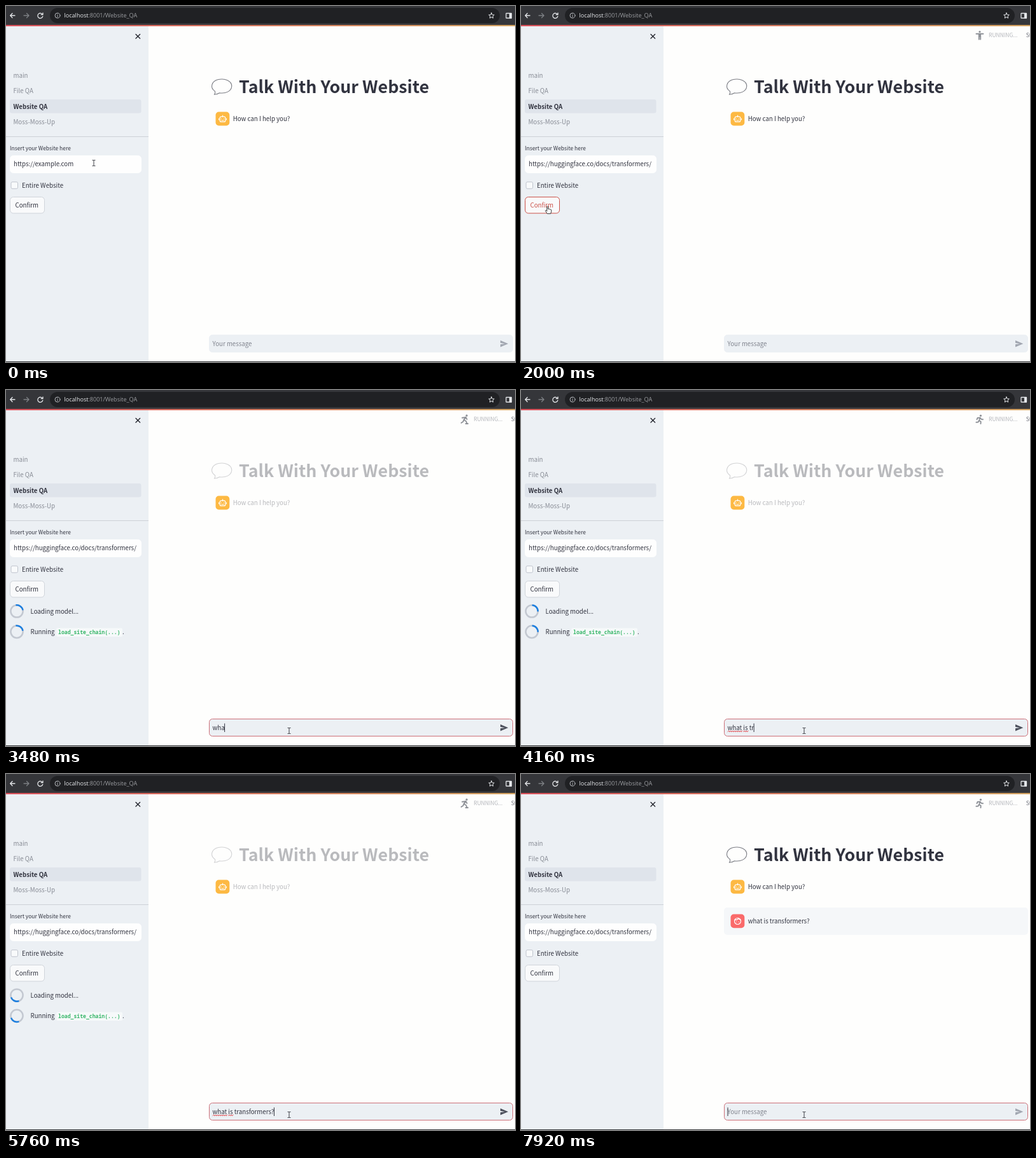
Write an HTML page that moves like this. It is 800 px wide and 560 px high and loops after 8000 ms.

```html
<!DOCTYPE html>
<html lang="en">
<head>
<meta charset="utf-8">
<title>Talk With Your Website</title>
<style>
html, body { margin: 0; width: 100%; height: 100%; overflow: hidden; background: #fefefd; }
svg { display: block; width: 800px; height: 560px; }
text { font: 9.7px "Noto Sans CJK JP", "Noto Sans CJK SC", "Noto Sans CJK", sans-serif; fill: #31333f; font-kerning: normal; white-space: pre; }
.bold { font-weight: 700; }
.nav { fill: #878b94; }
.title { font-size: 26.8px; font-weight: 700; }
.small { font-size: 8.5px; }
.url { font: 9.05px "Open Sans", "Noto Sans", sans-serif; fill: #9b9da1; }
.url tspan { fill: #e8eaed; }
.code { font: 600 8.14px "Noto Sans Mono", "DejaVu Sans Mono", monospace; fill: #35b567; }
.line { fill: none; stroke-linecap: round; stroke-linejoin: round; }
</style>
</head>
<body>
<svg viewBox="0 0 800 560">
  <defs>
    <linearGradient id="strip"><stop stop-color="#e04a55"/><stop offset="1" stop-color="#d9a45c"/></linearGradient>
    <g id="spinner">
      <circle r="9.6" fill="none" stroke="#c3c8d1" stroke-width="2.5"/>
      <path class="arc" d="M-6.8-6.8A9.6 9.6 0 0 1 6.8-6.8" fill="none" stroke="#1c7fe0" stroke-width="2.5"/>
    </g>
  </defs>

  <rect width="800" height="560" fill="#fefefd"/>
  <rect y="30" width="224" height="530" fill="#ecf0f4"/>

  <!-- browser bar -->
  <rect width="800" height="30" fill="#35363a"/>
  <rect x="69" y="3" width="707" height="24" rx="12" fill="#202124"/>
  <g class="line" stroke="#e4e6e9" stroke-width="1.3">
    <path d="M14 15H7M10 11.5L6.7 15 10 18.5"/>
    <path d="M28 15H35.5M32.5 11.5L36 15 32.5 18.5" stroke="#7d8084"/>
    <path d="M57.2 13A4 4 0 1 0 57.8 16.2M58 10.8V13.6H55.2"/>
    <circle cx="81" cy="15" r="4" stroke="#b5b8bc" stroke-width="1"/>
    <path d="M81 14.7V17M81 12.8V13" stroke="#b5b8bc" stroke-width="1"/>
    <path d="M763 10.8L764.2 13.7 767.3 14 765 16.1 765.7 19.1 763 17.5 760.3 19.1 761 16.1 758.7 14 761.8 13.7Z" stroke-width="1"/>
    <rect x="786" y="11.5" width="8.5" height="7.5" rx=".6"/>
  </g>
  <rect x="791" y="11" width="4" height="8.5" fill="#e4e6e9"/>
  <text class="url" x="91.5" y="18.3"><tspan>localhost</tspan>:8001/Website_QA</text>
  <rect y="29.8" width="800" height="2" fill="url(#strip)"/>

  <!-- sidebar -->
  <path class="line" d="M204 44.5L210.6 51.1M210.6 44.5L204 51.1" stroke="#25272f" stroke-width="1.4"/>
  <rect x="6" y="147" width="206.5" height="21.5" rx="3" fill="#dfe4eb"/>
  <text class="nav" x="11.5" y="113">main</text>
  <text class="nav" x="11.5" y="137.3">File QA</text>
  <text class="bold" x="11.5" y="161.7">Website QA</text>
  <text class="nav" x="11.5" y="186">Moss-Moss-Up</text>
  <path d="M0 205.5H224" stroke="#cdd1d7"/>
  <text class="small" x="6" y="227">Insert your Website here</text>
  <rect id="field" x="6.5" y="235.5" width="206" height="27" rx="5" fill="#fefefe"/>
  <rect id="selection" x="12" y="240.5" width="94.5" height="16" fill="#2f69c3"/>
  <text id="address" x="12" y="252.2"></text>
  <path id="fieldCaret" d="M0 242V256" stroke="#31333f"/>
  <rect x="8" y="276.8" width="10.5" height="10.5" rx="2" fill="#f8fafb" stroke="#bfc4cd"/>
  <text x="25" y="286">Entire Website</text>
  <rect id="button" x="6.5" y="300.5" width="54" height="25.5" rx="5" fill="#f9fafb"/>
  <text id="confirm" x="14.5" y="317">Confirm</text>
  <g id="loading">
    <use href="#spinner" x="17" y="348"/>
    <text x="38.5" y="352.2">Loading model...</text>
    <use href="#spinner" x="17" y="380.3"/>
    <text x="38.5" y="384.3">Running</text>
    <rect x="79" y="374.5" width="104" height="13.5" rx="2.5" fill="#f6f9fa"/>
    <text class="code" x="82" y="384">load_site_chain(...)</text>
    <text x="183" y="384.3">.</text>
  </g>

  <!-- run status -->
  <g id="status">
    <g id="poses" class="line" stroke="#8f9298" stroke-width="1.9" transform="translate(721 46)"></g>
    <text class="small" x="735" y="49" style="fill:#b4b6bb">RUNNING...</text>
    <text class="small" x="793.8" y="49" style="fill:#6b6e78">Stop</text>
  </g>

  <!-- conversation -->
  <g id="heading">
    <path class="line" d="M328.5 134.2C320 128.5 323 118.5 333 115.8C344 113 355.500 118 354.700 126.800C353.800 134.500 345 138 335.500 136.700C333.300 138.300 330.500 139.300 327.300 139.300C328.600 137.700 329 136 328.500 134.200Z" stroke="#7b7d84" stroke-width="1.1"/>
    <text class="title" x="366" y="137">Talk With Your Website</text>
    <text x="356.700" y="181">How can I help you?</text>
  </g>
  <rect x="329.500" y="166.500" width="21.800" height="21.800" rx="5" fill="#fdb943"/>
  <g class="line" stroke="#fff" stroke-width="1.200">
    <rect x="336.200" y="174.200" width="8.600" height="8" rx="2"/>
    <path d="M340.500 174V172M334.600 177.200V179M346.400 177.200V179M338.700 177.300V177.500M342.300 177.300V177.500M338.700 180H342.300"/>
  </g>
  <g id="question">
    <rect x="319" y="210" width="478" height="43" rx="5" fill="#f5f7f9"/>
    <rect x="329.500" y="220.500" width="21.800" height="21.800" rx="5" fill="#fa6a6a"/>
    <g class="line" stroke="#fff" stroke-width="1.200">
      <circle cx="340.500" cy="231.500" r="5"/>
      <path d="M336 229.500C339 230 341 229 341.800 227C342.700 228.700 344 229.300 345.200 229.300M338.800 232.500V232.700M342.200 232.500V232.700"/>
    </g>
    <text x="356.700" y="235.200">what is transformers?</text>
  </g>

  <!-- message box -->
  <rect id="box" x="319.500" y="517.500" width="477" height="27" rx="5" fill="#ecf0f4"/>
  <text id="draft" x="324.500" y="535"></text>
  <path id="squiggle" class="line" stroke="#e0393f" stroke-width=".9"/>
  <path id="boxCaret" d="M0 524.500V538" stroke="#31333f"/>
  <path id="send" d="M777 526L789.300 531.200 777 536.400V532.300L784 531.200 777 530.100Z"/>

  <path d="M0 559.500H800" stroke="#37383b"/>

  <g id="pointer">
    <path id="beam" class="line" d="M-2-4.500H-.6L0-4 .6-4.500H2M0-4V4M-2 4.500H-.6L0 4 .6 4.500H2" stroke="#3c3e45"/>
    <path id="arrow" d="M0 0V11L2.600 8.700 4.300 12.500 6 11.700 4.300 8H7.800Z" fill="#fff" stroke="#222" stroke-width=".8"/>
    <path id="hand" class="line" d="M-2.300 1V-4.500Q-1.400-6-.5-4.500V-.5L.8-1Q1.500-1 1.700-.2L2.500-.5Q3.300-.4 3.500.4Q4.700 0 4.700 1.300V3.200L3.600 6.700H-1.600L-4.600 2.600Q-4.500 1-3.400 1.500L-2.300 2.500Z" style="fill:#fff" stroke="#222" stroke-width=".9"/>
  </g>
</svg>

<script>
const DURATION = 8000;
const $ = id => document.getElementById(id);
const show = (id, on) => { $(id).style.display = on ? '' : 'none'; };
const set = (id, attrs) => { for (const k in attrs) $(id).setAttribute(k, attrs[k]); };
const within = (t, a, b) => t >= a && t < b;
const ease = u => u * u * (3 - 2 * u);
const ramp = (t, a, b) => Math.min(1, Math.max(0, (t - a) / (b - a)));
const blink = ms => Math.floor(ms / 530) % 2 === 0;

// Value at time t from rows of [time, value, ...].
function track(rows, t, column = 1, curve = u => u) {
  const next = rows.findIndex(row => row[0] > t);
  if (next < 0) return rows[rows.length - 1][column];
  if (next === 0) return rows[0][column];
  const [a, b] = [rows[next - 1], rows[next]];
  return a[column] + (b[column] - a[column]) * curve(ramp(t, a[0], b[0]));
}

const QUESTION = 'what is transformers?';
const KEYS = [[3200, 0], [3460, 3], [4820, 18], [5010, 20], [5260, 21]];
const POINTER = [[0, 138, 247], [1480, 138, 247], [1720, 43, 320], [2120, 43, 320], [2900, 445, 536]];
const FOCUS = 320, SELECT = 760, PASTE = 1300, CLICK = 1760, CHAT = 2980, SENT = 6480;

// Head position and limb strokes, centred on the icon.
const POSES = {
  stand: [0, -5.5, 'M-5.500-2.200H5.500M-1.200-2V6.500M1.200-2V6.500M0-2V2'],
  run: [1.5, -5.7, 'M.5-2.500L-1 2 1.700 3.800 1.500 7M-1 2L-2.500 4.500-5.500 4.800M-4.500.3L-3.300-2.300 .5-2.500 2.500 0 5 .3'],
  skate: [3, -5.8, 'M2-3L-1.500 1 2 3 3.500 6.500M-1.500 1L-2.500 3.800-5.500 5.700M-4-2.300L1.500-3 3.500 0M1.500 7H5'],
  swim: [4, -2.3, 'M-4.500-5L0-4.500 2-1.500M0-4.500L-4.500 0M-6.500 2.500Q-4.500 .8-2.200 2.500T2.200 2.500T6.500 2.500M-6.500 6Q-4.500 4.300-2.200 6T2.200 6T6.500 6']
};
const POSE_ORDER = ['swim', 'stand', 'run', 'skate', 'run', 'stand'];
$('poses').innerHTML = Object.entries(POSES).map(([name, [x, y, d]]) =>
  `<g id="${name}"><circle cx="${x}" cy="${y}" r="1.600" fill="#8f9298" stroke="none"/><path d="${d}"/></g>`).join('');

function wave(from, to) {
  let d = `M${from} 537.500`;
  for (let x = from + 1.5, up = true; x <= to; x += 1.5, up = !up) d += `L${x} ${up ? 536 : 538}`;
  return d;
}
set('squiggle', { d: wave(325, 347.5) + wave(349.5, 357.5) });

function drawSidebar(t, hover) {
  const focused = within(t, FOCUS, CLICK), selected = within(t, SELECT, PASTE);
  $('address').textContent = t < PASTE ? 'https://example.com' : 'https://huggingface.co/docs/transformers/';
  $('address').style.fill = selected ? '#fff' : '';
  set('field', { stroke: focused ? '#d9606a' : '#fefefe' });
  show('selection', selected);
  show('fieldCaret', focused && !selected && blink(t - (t < SELECT ? FOCUS : PASTE)));
  set('fieldCaret', { transform: `translate(${t < PASTE ? 107 : 207} 0)` });
  set('button', { stroke: hover ? '#cb5148' : '#d0d4da' });
  $('confirm').style.fill = hover ? '#cb5148' : '';
  show('loading', within(t, 2180, 6600));
  const turn = (t / 657 * 360 - 72) % 360;
  document.querySelector('.arc').setAttribute('transform', `rotate(${turn})`);
}

function drawStatus(t) {
  show('status', within(t, 1680, 6600) || t >= 6900);
  const pose = POSE_ORDER[Math.floor(t / 380) % POSE_ORDER.length];
  for (const name in POSES) show(name, name === pose);
}

function drawChat(t) {
  const stale = ramp(t, 2350, 2600) - ramp(t, 6600, 6760);
  set('heading', { opacity: 1 - 0.67 * stale });
  show('question', t >= 7000);

  const count = t < SENT ? Math.floor(track(KEYS, t)) : 0;
  const draft = $('draft');
  draft.textContent = count ? QUESTION.slice(0, count) : 'Your message';
  draft.style.fill = count ? '' : '#80848e';
  set('box', { stroke: t >= CHAT ? '#cc6f78' : '#ecf0f4' });
  set('send', { fill: count ? '#4d515d' : '#a2a7b1' });
  show('squiggle', count > 7);

  const typing = within(t, KEYS[0][0], KEYS[4][0]);
  const since = t >= SENT ? SENT : t >= KEYS[4][0] ? KEYS[4][0] : CHAT;
  show('boxCaret', t >= CHAT && (typing || blink(t - since)));
  const x = count ? 324.5 + draft.getComputedTextLength() : 325;
  set('boxCaret', { transform: `translate(${x} 0)` });
}

function drawPointer(x, y, t, hover) {
  const beam = y > 517 || (y > 235 && y < 263 && x < 213);
  show('pointer', !within(t, SELECT, 1480));
  set('pointer', { transform: `translate(${x} ${y})` });
  show('beam', beam);
  show('hand', hover);
  show('arrow', !beam && !hover);
}

function render(t) {
  const x = track(POINTER, t, 1, ease), y = track(POINTER, t, 2, ease);
  const hover = x < 61 && y > 300 && y < 327;
  drawSidebar(t, hover);
  drawStatus(t);
  drawChat(t);
  drawPointer(x, y, t, hover);
}

const start = performance.now();
function tick() {
  render((performance.now() - start) % DURATION);
  requestAnimationFrame(tick);
}
tick();
</script>
</body>
</html>
```
